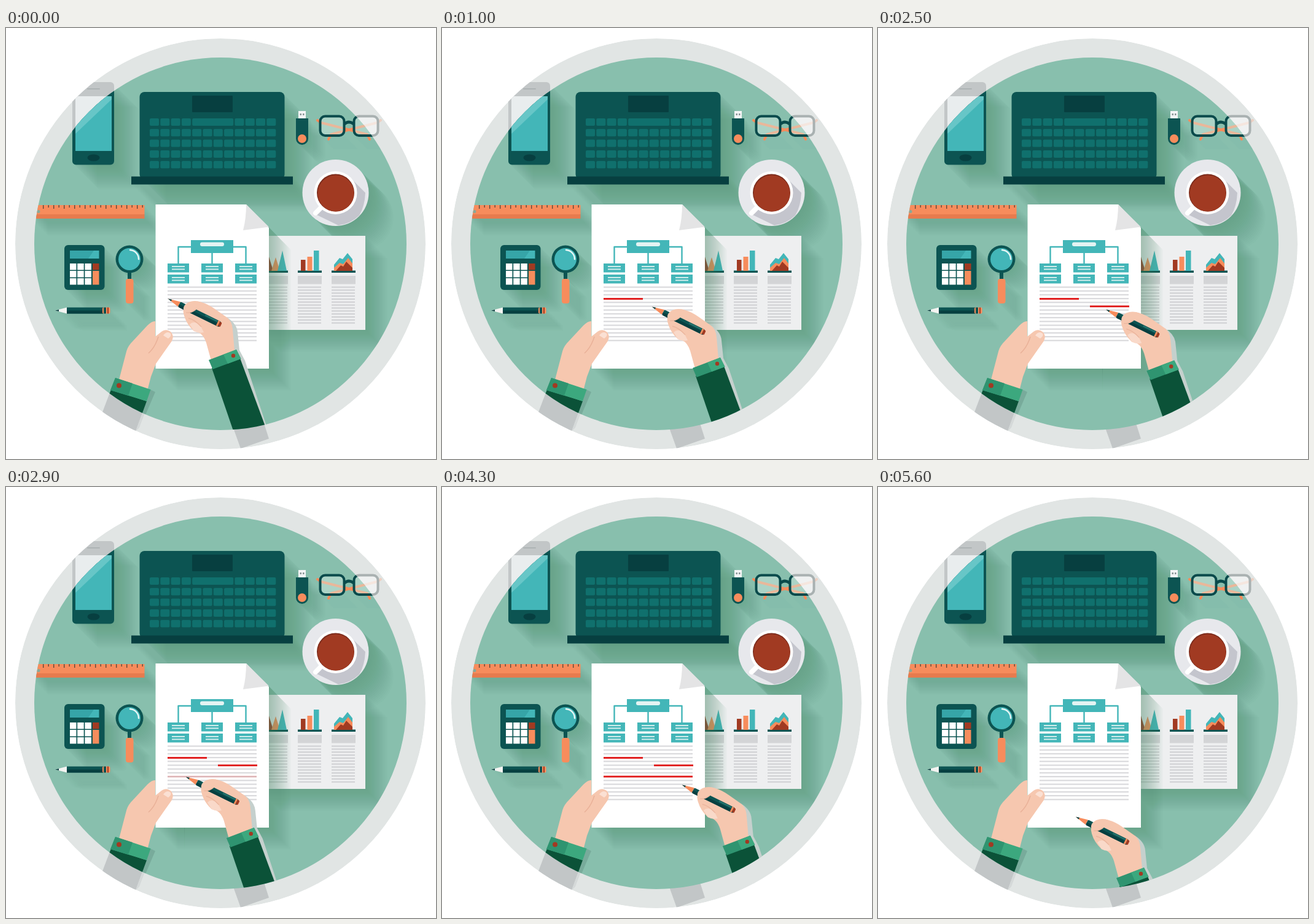
Write an HTML page that moves like this. It is 700 by 701 pixels and loops after 5.7 s.

```html
<!DOCTYPE html>
<html lang="en">
<head>
<meta charset="utf-8">
<title>Desk work</title>
<style>
html, body { margin: 0; width: 100%; height: 100%; overflow: hidden; background: #fff; }
svg { display: block; width: 100vw; height: 100vh; }
</style>
</head>
<body>
<svg id="stage" viewBox="0 0 700 701"></svg>
<script>
const DARK = '#0c5452', DEEP = '#073f40', TEAL = '#43b6b8', ORANGE = '#f78c5c',
  RUST = '#a13a22', SKIN = '#f6c7af', GHOST = '#c2c6c7', SLEEVE = '#0b5238';

const paint = f => f ? ` fill="${f}"` : '';
const rect = (x, y, w, h, f, r = 0) =>
  `<rect x="${x}" y="${y}" width="${w}" height="${h}" rx="${r}"${paint(f)}/>`;
const disc = (x, y, r, f) => `<circle cx="${x}" cy="${y}" r="${r}"${paint(f)}/>`;
const path = (d, f) => `<path d="${d}"${paint(f)}/>`;
const line = (d, color, w, cap = 'butt') =>
  `<path d="${d}" fill="none" stroke="${color}" stroke-width="${w}" stroke-linecap="${cap}" stroke-linejoin="round"/>`;
const repeat = (n, fn) => Array.from({ length: n }, (_, i) => fn(i)).join('');

// Long diagonal shadow built from faint shifted copies
const cast = (shape, n = 20) => `<g fill="#3c7868" fill-opacity=".03">` +
  repeat(n, i => `<g transform="translate(${i * 2 + 2} ${i * 2 + 2})">${shape}</g>`) + '</g>';

function phone(body, screen, button) {
  return rect(108, 88, 68, 134.5, body, 6) + rect(113, 111, 59, 89, screen) +
    `<ellipse cx="142.500" cy="211" rx="10" ry="5.500" fill="${button}"/>` +
    line('M133 99H152', '#aeb4b5', 2, 'round');
}

function laptop() {
  const body = rect(217.5, 104, 236, 142, DARK, 8) + rect(204, 241.5, 263, 13, DEEP);
  const key = (col, row, w = 15) => rect(234 + col * 17.3, 147 + row * 17.3, w, 12, '#10706d', 2);
  const keys = repeat(5, row => repeat(12, col =>
    row || col < 4 || col > 7 ? key(col, row) : col === 4 ? key(4, 0, 67) : ''));
  return cast(rect(217.5, 104, 236, 142, '', 8) + rect(204, 241.5, 263, 13), 22) +
    body + rect(303, 110, 66, 27, DEEP, 1) + keys;
}

function usbStick() {
  const body = 'M472 147H492V180A10 10 0 0 1 472 180Z';
  return cast(path(body), 14) + rect(476, 135, 12, 13, '#f4f5f6') +
    rect(478.5, 139, 2.5, 3, '#8b9798') + rect(483, 139, 2.5, 3, '#8b9798') +
    path(body, DARK) + disc(482, 180, 7, ORANGE);
}

function glasses(frame, temple, glass) {
  const lens = x => `<rect x="${x}" y="143.500" width="39" height="31.500" rx="8" fill="${glass}" fill-opacity=".45" stroke="${frame}" stroke-width="4"/>`;
  return line('M507 150L513 154L588 173L592 181M610 150L604 154L529 173L525 181', temple, 4, 'round') +
    lens(511.5) + lens(566.5) + line('M551 156Q558 150 566 156', frame, 5);
}

function coffee() {
  return cast(disc(536.5, 268, 54), 20) + disc(536.5, 268, 54, '#e7e8ec') +
    path('M561 244L585 268Q584 290 575 305Q560 319 541 321L504 303L515 290Z', '#c4c5cd') +
    line('M513 292L504 301', '#fff', 8, 'round') +
    disc(536.5, 268, 35, '#fff') + disc(536.5, 268, 30.5, '#7d2d1d') + disc(537, 269, 29.5, RUST);
}

function ruler() {
  return cast(rect(40, 288, 185, 22), 14) + rect(40, 288, 185.5, 15, ORANGE) +
    rect(40, 303, 185.5, 7, '#e77b4e') + disc(53, 298.5, 2.5, '#88a898') +
    repeat(20, i => rect(60 + i * 8.5, 288, 1.4, i % 2 ? 4 : 6, '#5b4a3c'));
}

function calculator() {
  return cast(rect(95, 353, 65, 73, '', 6), 18) + rect(95, 353, 65.5, 73, DARK, 6) +
    rect(104, 362, 47.5, 13, TEAL) + path('M104 362H143L134 375H104Z', '#36a5a8') +
    repeat(9, i => rect(104 + i % 3 * 12.2, 383 + Math.floor(i / 3) * 12, 10.5, 10.5, '#fff')) +
    rect(141, 383, 10.5, 10.5, RUST) + rect(141, 395, 10.5, 22.5, ORANGE);
}

function magnifier() {
  return cast(disc(201, 376, 22) + rect(195, 408, 12.5, 40, '', 4), 14) +
    rect(198, 396, 6, 15, DARK) + rect(195, 408, 12.5, 40, ORANGE, 4) +
    disc(201, 376, 22.5, DARK) + disc(201, 376, 18, TEAL) +
    line('M202 361A15 15 0 0 1 216 376', '#e6f6f5', 2.5, 'round');
}

function looseePen() {
  return '';
}

function pencil() {
  return cast(path('M80 459.500L99 455H169V464.500H99Z'), 14) + path('M80 459.500L99 454.500V464.500Z', '#f4f4f2') +
    path('M80 459.500L86 458V461Z', DEEP) + rect(99, 454.5, 59, 10, DARK) + rect(99, 459.5, 59, 5, DEEP) +
    rect(157, 454.5, 12.5, 10, ORANGE, 2) + rect(159, 454.5, 4, 10, DARK) + rect(165, 454.5, 2, 10, RUST);
}

function report() {
  const columns = repeat(3, i => {
    const x = 420 + i * 55;
    return rect(x, 394.5, 39, 3.5, DARK) + rect(x, 403, 39, 13.5, '#d3d4d6') +
      repeat(13, k => rect(x, 420.5 + k * 4.85, 38, 2, '#cfd0d3'));
  });
  return cast(rect(410, 338, 175, 153), 18) + rect(410, 338, 175, 153, '#eeeff0') + columns +
    path('M420 395L428 372L435 395Z', RUST) + path('M432 395L439 373L446 395Z', ORANGE) +
    path('M442 395L450 362L457 395Z', TEAL) +
    rect(480, 377, 7.5, 18, RUST) + rect(490.5, 372, 8, 23, ORANGE) + rect(501, 362, 8.5, 33, TEAL) +
    path('M534 395V385L543 374L548 376L556 366L564 376V395Z', TEAL) +
    path('M534 395V390L543 382L549 384L557 374L564 383V395Z', ORANGE) +
    path('M537 395L545 386L549 388L554 380L564 390V395Z', RUST);
}

function paper() {
  const sheet = 'M243.500 287H391L428 325V554H243.500Z';
  const box = (x, y) => rect(x, y, 35, 14.5, TEAL) + rect(x + 7, y + 4, 21, 1.8, '#dff2f1') + rect(x + 7, y + 8.5, 21, 1.8, '#dff2f1');
  return cast(path(sheet), 18) + path(sheet, '#fff') +
    path('M391 287L428 323.500L386 329Q391 310 391 287Z', '#e4e4e5') +
    line('M301 356H280.500V384M370 356H390.500V384M335.500 366V384', TEAL, 2.4) +
    rect(301, 345, 69, 21, TEAL) + rect(316, 348.5, 39, 6.5, '#e4f4f3', 3.2) +
    repeat(6, i => box(263 + i % 3 * 55, i < 3 ? 383 : 401)) +
    repeat(15, i => rect(263, 420.4 + i * 6.2, 145, 2.2, '#dadadd'));
}

function leftHand() {
  const skin = 'M243 477Q238 476 230 484L203 513Q197 520 195 530L184 572L230 590L236 567L244 546L268 512Q275 503 269 495Q261 488 253 494L243 502Z';
  return path('M228 606L235 588L243 592L225 634L200 650Z', '#78ab9b') +
    path('M171 588L229 607L211 656L155 630Z', SLEEVE) + path(skin, SKIN) +
    line('M232 529Q243 519 248 502', '#e9b198', 1.5) +
    path('M256 500Q262 492 268 497Q270 501 264 505Z', '#fbe0d3') +
    path('M178 569L235.500 588L229 607L170 589Z', '#3ca87e') + path('M178 569L206 578L199 598L170 589Z', '#2f9470') +
    disc(184, 581.5, 4, RUST);
}

function rightHand() {
  const skin = 'M294 449Q304 442 318 446Q329 449 340 457L360 471Q368 477 369 490L372 525L334 541L326 512Q320 494 306 493Q294 482 290 468Q286 456 294 449Z';
  const pen = `<g transform="translate(264 440.500) rotate(26.200)">` +
    path('M0 0L20 -4.500V4.500Z', ORANGE) + path('M0 0L6 -1.500V1.500Z', DEEP) +
    rect(20, -4.7, 74, 9.4, DARK, 2) + rect(20, 0, 74, 4.7, DEEP, 2) +
    rect(66, -3.5, 22, 1.6, '#2c7b74') + rect(89, -4.7, 3, 9.4, ORANGE) + rect(92, -4, 4, 8, RUST, 2) + '</g>';
  return path('M360 471Q376 481 377 495L380 524L389 541L425 650H390L350 540Z', '#c5d0cd') +
    path('M335 553L381 537L421 645L432 680L382 690Z', SLEEVE) +
    path(skin, SKIN) + path('M299 482Q307 474 317 485L322 495Q313 497 306 493Z', '#f9d9c9') +
    line('M297 472Q307 474 318 486', '#ebb59d', 1.3) + pen +
    path('M289 458Q288 451 297 446Q307 442 318 446L326 452Q326 456 319 457L309 458Q300 466 292 463Z', SKIN) +
    line('M293 463Q301 464 309 458', '#ebb59d', 1.2) +
    path('M330 540L375 523L382.500 538L336.500 555Z', '#2f9470') + path('M354 531L375 523L382.500 538L361 546Z', '#3ca87e') +
    disc(370, 533, 3.2, RUST);
}

const marks = [
  { start: 0, x: 263, y: 440.5, w: 64 },
  { start: 10, x: 345, y: 452.8, w: 64 },
  { start: 28, x: 263, y: 471, w: 145 }
];

const stage = document.getElementById('stage');
stage.innerHTML = `
  <defs>
    <clipPath id="desk">${disc(349, 351, 303)}</clipPath>
    <clipPath id="rim">${disc(349, 351, 334)}</clipPath>
  </defs>
  <g clip-path="url(#rim)">
    ${disc(349, 351, 334, '#e1e5e4')}
    ${phone(GHOST, '#e9edee', GHOST)}
    ${glasses('#a9b1b1', '#ecd0c3', '#fff')}
    ${path('M171 588L229 607L211 656L155 630Z', GHOST)}
    ${path('M229 607L235 590L239 592L217 650L211 656Z', '#d5d9d9')}
    ${path('M368 645L382 684L428 668L419 640Z', GHOST)}
  </g>
  <g clip-path="url(#desk)">
    ${disc(349, 351, 304, '#88bfad')}
    ${cast(rect(108, 88, 68, 134.5, '', 6), 20)}${phone(DARK, TEAL, DEEP)}
    ${path('M113 111H172V116L113 172Z', '#67c6c7')}
    ${laptop()}${usbStick()}
    ${cast(line('M512 176H552M567 176H606', '#3c7868', 3).replaceAll('stroke=', 'stroke-opacity=".02" stroke='), 10)}
    ${glasses('#0a4a4b', ORANGE, '#d8ebe5')}
    ${coffee()}${ruler()}${calculator()}${magnifier()}${pencil()}${report()}${paper()}
    ${marks.map(m => rect(m.x, m.y - 1.4, m.w, 2.8, '#e11717').replace('<rect', '<rect class="mark"')).join('')}
    ${leftHand()}
    <g id="hand">${rightHand()}</g>
  </g>`;

const hand = document.getElementById('hand');
const markNodes = stage.querySelectorAll('.mark');

// Writing hand: step (100 ms), dx, dy
const poses = [[0, 0, 0], [5, 63, 0], [9, 63, 0], [10, 78, 13], [15, 143, 13], [24, 143, 13],
  [28, 0, 31], [33, 144, 31], [42, 144, 31], [47, 58, 96], [57, 58, 96]];
const clamp = v => Math.max(0, Math.min(1, v));

function draw() {
  const step = Math.floor(performance.now() % 5700 / 100);
  const next = poses.findIndex(p => p[0] > step);
  const [s0, x0, y0] = poses[next - 1], [s1, x1, y1] = poses[next];
  const k = (step - s0) / (s1 - s0);
  hand.setAttribute('transform', `translate(${x0 + (x1 - x0) * k} ${y0 + (y1 - y0) * k})`);
  markNodes.forEach((node, i) =>
    node.setAttribute('opacity', clamp((step - marks[i].start) / 5) * clamp((56 - step) / 5)));
  requestAnimationFrame(draw);
}
draw();
</script>
</body>
</html>
```
